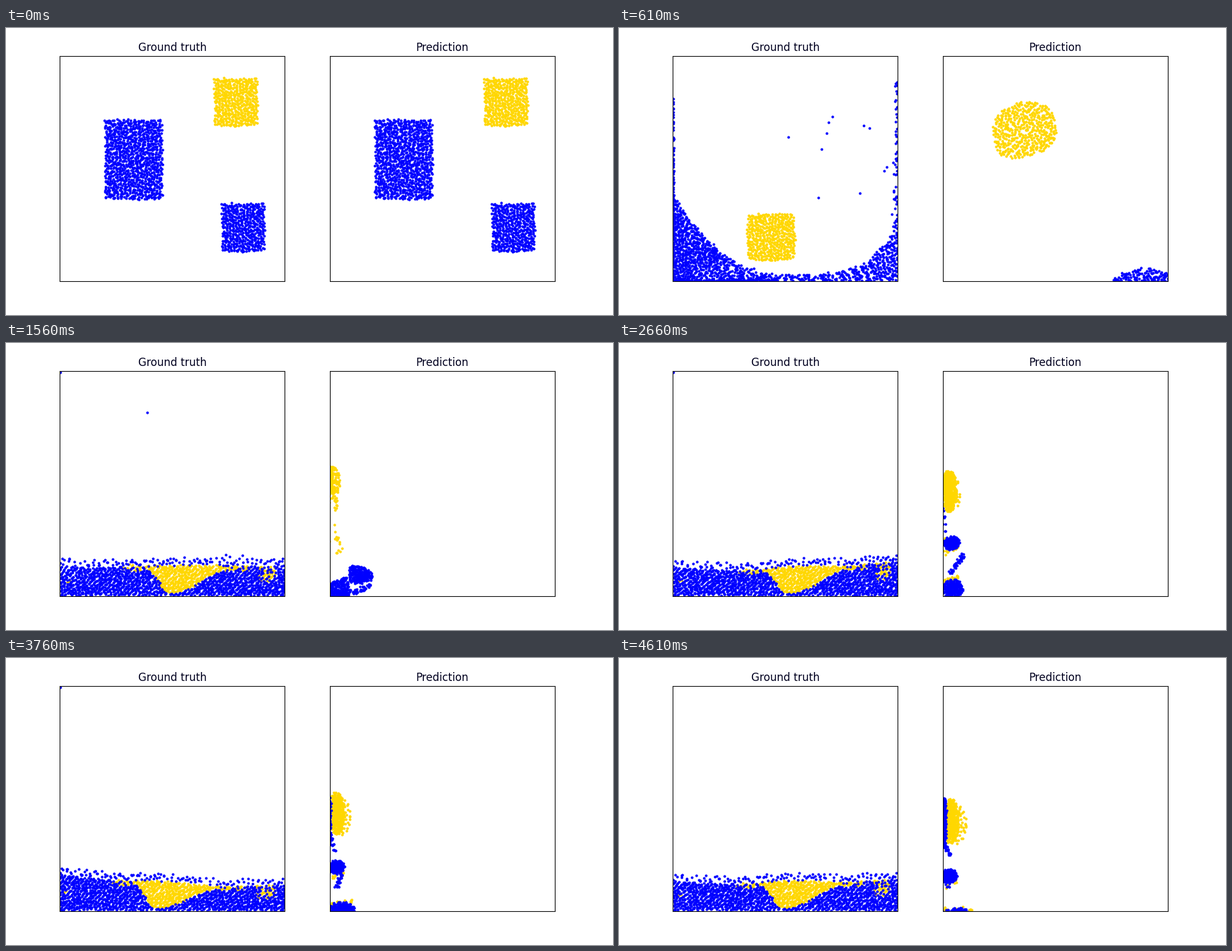
A matplotlib script for the animation above (4650 ms loop, 950 px wide and 450 px high).

```python
import numpy as np
import matplotlib.pyplot as plt
from matplotlib.animation import FuncAnimation

W, H, DPI = 950, 450, 100
SIDE = 352.27              # inner size of each panel in pixels
LOOP, STEP = 4650, 30      # milliseconds
G = 0.001368               # gravity, px / ms^2
BLUE, GOLD, INK = "#0000ff", "#ffd700", "#00001f"
N_BLUE, N_GOLD = 1450, 470
N_LEFT = int(N_BLUE * 0.68)
N_RIGHT = N_BLUE - N_LEFT
SETTLED = 1600             # from here on the true fluid is a sloshing pool
LATE = 1810, 2660, 3760, 4610


# ---------- shapes: each maps the unit square to a region ----------
def quasi(n):
    """Evenly spread points in the unit square."""
    i = np.arange(1, n + 1)
    return (0.5 + i * 0.7548776662) % 1, (0.5 + i * 0.5698402910) % 1


def band(share, x0, x1, top, bottom=SIDE):
    """Region between two curves, each a number or a function of x."""
    def curve(f, x):
        return f(x) if callable(f) else np.full_like(x, f)

    def sample(u, v):
        grid = np.linspace(x0, x1, 200)
        thick = np.maximum(curve(bottom, grid) - curve(top, grid), 0.1)
        mass = np.cumsum(thick)
        x = np.interp(u * mass[-1], mass, grid)
        y = curve(top, x)
        return x, y + v * (curve(bottom, x) - y)
    return share, sample


def blob(share, cx, cy, rx, ry, power=0.5):
    """Ellipse; a higher power gathers the points in the middle."""
    def sample(u, v):
        r, a = v ** power, 2 * np.pi * u
        return cx + rx * r * np.cos(a), cy + ry * r * np.sin(a)
    return share, sample


def trail(share, width, start, end, sag=0):
    """Thin stream between two points, bent down by sag."""
    (x0, y0), (x1, y1) = start, end
    size = np.hypot(x1 - x0, y1 - y0)

    def sample(u, v):
        off = (v - 0.5) * width / size
        return (x0 + (x1 - x0) * u - (y1 - y0) * off,
                y0 + (y1 - y0) * u + (x1 - x0) * off + 4 * sag * u * (1 - u))
    return share, sample


def kd_sort(p, axis=0):
    """Order points by halving in x and y, so that two sets pair up smoothly."""
    if len(p) < 2:
        return p
    p = p[np.argsort(p[:, axis], kind="stable")]
    half = len(p) // 2
    return np.vstack([kd_sort(p[:half], 1 - axis), kd_sort(p[half:], 1 - axis)])


def build(shapes, n):
    """Spread n points over the shapes; the last shape takes the rest."""
    rng, sets, left = np.random.default_rng(7), [], n
    for k, (share, sample) in enumerate(shapes):
        count = left if k == len(shapes) - 1 else max(1, round(share * n))
        left -= count
        sets.append(np.column_stack(sample(*quasi(count))))
    p = np.vstack(sets)
    return kd_sort(p + rng.uniform(-1.2, 1.2, p.shape))


# ---------- settled pool ----------
def is_gold(x, s):
    luck = np.random.default_rng(11).random(len(x))
    wedge = (x > 165 - 36 * s) & (x < 172 + 95 * s ** 0.8) & (s > 0.06) & (s < 0.93)
    strip = (abs(x - 198) < 102) & (abs(s - 0.86) < 0.08) & (luck < 0.6)
    patch = (abs(x - 325) < 13) & (s > 0.45) & (s < 0.95) & (luck < 0.6)
    bits = (abs(x - 13) < 5) & (abs(s - 0.45) < 0.15) & (luck < 0.35)
    return wedge | strip | patch | bits


def pool_seeds():
    rng = np.random.default_rng(5)
    u, v = quasi(6000)
    x = np.clip(u * SIDE + rng.uniform(-1.6, 1.6, len(u)), 0, SIDE)
    s = np.clip(v + rng.uniform(-0.03, 0.03, len(v)), 0, 1)
    gold = is_gold(x, s)
    p = np.column_stack([x, 1 - s])
    blue = p[~gold][:N_BLUE]
    blue = blue[np.argsort(blue[:, 0])]
    return [kd_sort(q) for q in (blue[:N_LEFT], blue[N_LEFT:], p[gold][:N_GOLD])]


def pool(seeds, t):
    """Sloshing layer: a sum of standing waves."""
    x, s = seeds[:, 0], 1 - seeds[:, 1]
    since = t - 1810
    waves = {
        1: 8 * np.cos(2 * np.pi * (t - 3720) / 3000),
        2: -4 * np.cos(2 * np.pi * since / 1300) * np.exp(-since / 900),
        4: 2 * np.clip(since / 800, 0, 1),
    }
    depth, shift = 51.0, 0.0
    for n, a in waves.items():
        k = n * np.pi / SIDE
        depth = depth + a * np.cos(k * x)
        shift = shift - a / (51 * k) * np.sin(k * x)
    loose = np.where(s > 0.94, x * 7.3 % 1 * 10, 0)
    return np.column_stack([x + shift, SIDE - 1 - s * (depth - 3) - loose])


# ---------- tracks ----------
class Track:
    """Particles thrown as a block, then led through poses on smooth curves."""

    def __init__(self, n, block, v, g, flight, poses, seeds=None):
        x0, y0, x1, y1 = block
        start = build([band(1, x0, x1, y0, y1)], n)
        keys = [(t, start + [v[0] * t, v[1] * t + g * t * t / 2]) for t in flight]
        keys += [(t, build(shapes, n)) for t, shapes in poses.items()]
        if seeds is not None:
            keys += [(t, pool(seeds, t)) for t in range(SETTLED, LOOP + 1, 150)]
        self.t = np.array([k[0] for k in keys], float)
        self.p = np.array([k[1] for k in keys])
        self.v = np.gradient(self.p, self.t, axis=0, edge_order=2)

    def at(self, t):
        t = min(t, self.t[-1])
        i = min(np.searchsorted(self.t, t, "right") - 1, len(self.t) - 2)
        d = self.t[i + 1] - self.t[i]
        u = (t - self.t[i]) / d
        rise = u * u * (3 - 2 * u)
        return (self.p[i] * (1 - rise) + self.p[i + 1] * rise
                + d * u * (1 - u) ** 2 * self.v[i] - d * u * u * (1 - u) * self.v[i + 1])


def swell(base, rise, reach):
    """Surface that climbs towards the right wall."""
    return lambda x: SIDE - base - rise * np.exp((x - SIDE) / reach)


def late(rule):
    return {t: rule(k) for k, t in enumerate(LATE)}


LEFT_BOX = 71, 99, 160, 224
RIGHT_BOX = 254, 230, 320, 306
GOLD_BOX = 242, 34, 309, 109

seed_left, seed_right, seed_gold = pool_seeds()


def seam(x):
    """Border between the gold layer and the blue below it."""
    return 347 - 0.2 * (x - 105)


true_left = Track(N_LEFT, LEFT_BOX, (-0.24, 0.126), G, (0, 130, 260), {
    390: [trail(0.015, 2, (1, 47), (3, 150)),
          trail(0.015, 4, (84, 345), (97, 301)),
          trail(0.03, 16, (68, 341), (88, 343)),
          band(1, 0, 68, lambda x: 140 + 1.75 * x)],
    700: [trail(0.05, 3, (1, 90), (2, 240)),
          band(1, 0, 200, lambda x: SIDE - 115 * np.exp(-x / 70))],
    1050: [trail(0.03, 4, (1, 60), (2, 340)),
           trail(0.07, 8, (3, 212), (66, 272)),
           band(0.28, 105, 250, seam),
           band(1, 0, 108, lambda x: 266 + 0.017 * (x - 66) ** 2)],
}, seed_left)

true_right = Track(N_RIGHT, RIGHT_BOX, (0.27, 0.25), G, (0, 55, 110), {
    250: [trail(0.08, 4, (350, 200), (350, 60)),
          band(1, 200, SIDE, swell(6, 150, 30))],
    390: [trail(0.012, 2, (SIDE, 1), (270, 1)),
          trail(0.1, 4, (349, 260), (350, 2)),
          band(1, 108, SIDE, swell(4, 95, 40))],
    700: [blob(0.015, 220, 40, 90, 35),
          trail(0.08, 4, (350, 240), (350, 50)),
          band(1, 100, SIDE, swell(12, 95, 35))],
    1050: [blob(0.015, 225, 45, 60, 45),
           trail(0.06, 2, (240, 262), (310, 257), 42),
           trail(0.05, 8, (310, 258), (350, 268)),
           trail(0.06, 3, (350, 105), (350, 300)),
           band(1, 235, SIDE, lambda x: 326 - 38 * ((x - 280) / 72) ** 2)],
}, seed_right)

true_gold = Track(N_GOLD, GOLD_BOX, (-0.213, -0.031), G, (0, 200, 390, 560), {
    760: [blob(1, 162, 310, 65, 36)],
    1050: [trail(0.01, 4, (32, 165), (2, 290)),
           trail(0.08, 6, (55, 248), (105, 295)),
           trail(0.16, 8, (225, 316), (338, 300), 10),
           trail(0.06, 9, (340, 300), (315, 265)),
           band(1, 103, 225, lambda x: 294 + 0.0014 * (x - 103) ** 2, seam)],
}, seed_gold)

guess_left = Track(N_LEFT, LEFT_BOX, (-0.365, 0), 0.00043, (0, 130, 260), {
    390: [band(0.07, 0, 26, 129, 257), band(1, -90, -3, 130, 258)],
    1050: [band(1, -60, -8, 130, 330)],
    **late(lambda k: [trail(0.01 * k, 4, (0, 200 + 15 * k), (1 + 4 * k, 258 + 3 * k)),
                      band(1, -36, -7 + 4 * k, 175, 250)]),
})

guess_right = Track(N_RIGHT, RIGHT_BOX, (0.154, 0.1), 0.0002, (0, 130, 260), {
    390: [blob(1, SIDE, SIDE, 42, 47, 0.8)],
    700: [blob(1, 285, 357, 60, 20)],
    1050: [blob(1, 163, 357, 66, 13)],
    1430: [blob(1, 45, 350, 45, 20)],
    **late(lambda k: [trail(0.12 - 0.03 * k, 6, (46 - 14 * k, 283 + 5 * k), (10, 318)),
                      blob(0.4, 10 + 24 * np.exp(-2 * k), 255 + 14 * k, 12, 10),
                      blob(1, 12 + 3 * k, 332 + 9.5 * k, 11 + 5 * k, 17 - 2 * k)]),
})

guess_gold = Track(N_GOLD, GOLD_BOX, (-0.22, 0.02), 0.0001, (0, 130, 260), {
    390: [band(1, 146, 240, lambda x: 48 + 0.004 * (x - 215) ** 2,
               lambda x: 118 + 0.003 * (x - 215) ** 2)],
    700: [blob(1, 95, 130, 48, 48)],
    1050: [trail(0.05, 5, (2, 190), (3, 240)),
           trail(0.055, 14, (28, 195), (36, 310)),
           trail(0.01, 4, (0, 310), (10, 345)),
           blob(1, -8, 160, 50, 36, 0.7)],
    **late(lambda k: [blob(0.03 + 0.04 * k, 14 + 3 * k, 180 + 12 * k, 9 + 2 * k, 30),
                      blob(0.09 - 0.02 * k, 10, 257 + 16 * k, 13, 14),
                      trail(0.04, 5, (2, 318 + 11 * k), (15 + 13 * k, 305 + 16 * k)),
                      blob(1, 8 + 1.4 * k, 176 + 11.5 * k, 12, 31 + k)]),
})


def drops(t):
    """Two stray drops: one clings to the corner, one flies over the pool."""
    out = []
    if t > 1500:
        out.append((0.5, 1.5 + G / 2 * max(0, t - 3900) ** 2))
    if t > 1130:
        d = t - 1810
        out.append((144 + 0.03 * d, 34 + 0.05 * d + G / 2 * d * d))
    return np.reshape(out, (-1, 2))


# ---------- drawing ----------
fig = plt.figure(figsize=(W / DPI, H / DPI), dpi=DPI, facecolor="white")


def panel(x, title):
    ax = fig.add_axes([x / W, (H - 44.4 - SIDE) / H, SIDE / W, SIDE / H])
    ax.set(xlim=(0, SIDE), ylim=(SIDE, 0), xticks=[], yticks=[])
    ax.set_title(title, fontsize=12, color=INK, fontname="DejaVu Sans")
    return [ax.plot([], [], "o", ms=2, color=c)[0] for c in (GOLD, BLUE)]


true_dots = panel(84, "Ground truth")
guess_dots = panel(84 + 1.2 * SIDE, "Prediction")


def update(i):
    t = i * STEP
    blue = np.vstack([true_left.at(t), true_right.at(t), drops(t)])
    for dots, p in zip(true_dots, (true_gold.at(t), blue)):
        dots.set_data(*np.clip(p, 0.8, SIDE - 0.8).T)
    blue = np.vstack([guess_left.at(t), guess_right.at(t)])
    for dots, p in zip(guess_dots, (guess_gold.at(t), blue)):
        dots.set_data(*p.T)
    return true_dots + guess_dots


anim = FuncAnimation(fig, update, frames=LOOP // STEP, interval=STEP,
                     repeat=True, repeat_delay=0, blit=False)
plt.show()
```
